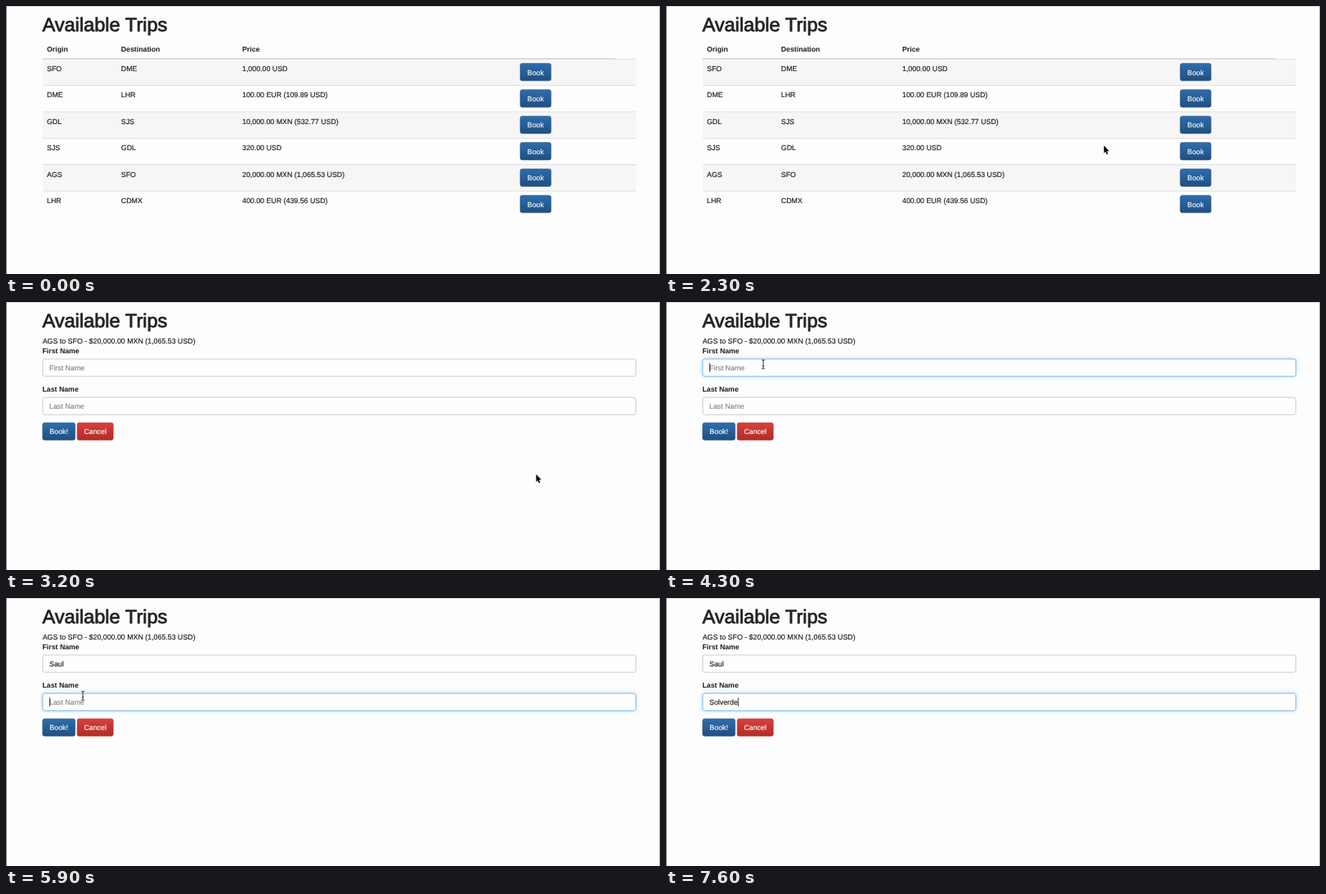
Animation of 800x329 px, one loop 8 s. Source, as an HTML page:

```html
<!DOCTYPE html>
<html lang="en">
<head>
<meta charset="utf-8">
<title>Available Trips</title>
<style>
html, body { margin: 0; width: 100%; height: 100%; overflow: hidden; background: #fdfdfd }
svg { display: block; width: 100%; height: 100% }
text { font: 8.84px "Liberation Sans", Arial, sans-serif; fill: #1c1c1c; stroke: #1c1c1c; stroke-width: .15; white-space: pre; text-rendering: geometricPrecision }
.bold { font-weight: bold; font-size: 8.75px; stroke: none }
.title { font-size: 23.6px; fill: #222; stroke: #222; stroke-width: .75 }
.label { fill: #fff; stroke: #fff; text-anchor: middle }
.hint { fill: #858585; stroke: #858585 }
.field { fill: #fefefe; stroke: #c8c8c8; stroke-width: .9 }
.field.focus { stroke: #78b8ee; filter: drop-shadow(0 0 2px rgba(102, 175, 233, .5)) }
.blue { fill: url(#blue); stroke: #24527f; stroke-width: .6 }
.blue.hover { fill: #204f80 }
.red { fill: url(#red); stroke: #b4302d; stroke-width: .6 }
</style>
</head>
<body>
<svg viewBox="0 0 800 329">
  <defs>
    <linearGradient id="blue" x2="0" y2="1"><stop stop-color="#2e6dae"/><stop offset="1" stop-color="#204f80"/></linearGradient>
    <linearGradient id="red" x2="0" y2="1"><stop stop-color="#d5413d"/><stop offset="1" stop-color="#b32b28"/></linearGradient>
  </defs>
  <path d="M0 .5H800" stroke="#d4d4d4"/>
  <path d="M.5 0V329" stroke="#858585"/>
  <path d="M799.5 0V329" stroke="#bcbcbc"/>
  <text class="title" x="44.4" y="31">Available Trips</text>
  <g id="table"></g>
  <g id="form"></g>
  <g id="cursor">
    <path id="arrow" d="M0 0V9.4L2 7.5 3.5 10.9 5 10.3 3.5 6.9H6.4Z" stroke="#fff" stroke-width="1" paint-order="stroke"/>
    <path id="beam" d="M-2 -5.5Q0 -5.5 0 -4.3Q0 -5.5 2 -5.5M0 -4.3V4.3M-2 5.5Q0 5.5 0 4.3Q0 5.5 2 5.5M-1.2 1.8H1.2" fill="none" stroke="#222" stroke-width=".9"/>
    <path id="hand" d="M-1 .8Q0 -.8 1 .8V4.2L5.5 5.2Q6.5 5.6 6.2 7L5.2 11.5H-.8L-4 7.2Q-4.3 5.6 -2.6 6L-1 7.2Z" fill="#fff" stroke="#111" stroke-width=".9"/>
  </g>
</svg>
<script>
const $ = id => document.getElementById(id);

function add(parent, tag, attrs, content = '') {
  const el = document.createElementNS('http://www.w3.org/2000/svg', tag);
  for (const k in attrs) el.setAttribute(k, attrs[k]);
  el.textContent = content;
  return parent.appendChild(el);
}
const text = (parent, x, y, str, cls = '') => add(parent, 'text', { x, y, class: cls }, str);
const box = (parent, x, y, width, height, cls) => add(parent, 'rect', { x, y, width, height, rx: 2.5, class: cls });
function button(parent, x, y, width, label, cls) {
  const rect = box(parent, x, y, width, 21.4, cls);
  text(parent, x + width / 2, y + 14.1, label, 'label');
  return rect;
}

const table = $('table'), form = $('form');
const columns = [50, 140.8, 289], rowHeight = 32.4;
const rows = [
  ['SFO', 'DME', '1,000.00 USD'],
  ['DME', 'LHR', '100.00 EUR (109.89 USD)'],
  ['GDL', 'SJS', '10,000.00 MXN (532.77 USD)'],
  ['SJS', 'GDL', '320.00 USD'],
  ['AGS', 'SFO', '20,000.00 MXN (1,065.53 USD)'],
  ['LHR', 'CDMX', '400.00 EUR (439.56 USD)']
];
const books = rows.map((cells, i) => {
  const y = 64.8 + i * rowHeight;
  if (i % 2 == 0) add(table, 'rect', { x: 45, y, width: 726, height: rowHeight, fill: '#f6f6f6' });
  add(table, 'rect', { x: 45, y, width: 726, height: .7, fill: '#d6d6d6' });
  cells.forEach((c, j) => text(table, columns[j], y + 15.2, c));
  return button(table, 629, y + 5.6, 37.7, 'Book', 'blue');
});
add(table, 'rect', { x: 45, y: 64, width: 700, height: 1.3, fill: '#d6d6d6' });
['Origin', 'Destination', 'Price'].forEach((h, j) => text(table, columns[j], 55.8, h, 'bold'));

function makeField(name, y) {
  text(form, 44.5, y - 6.7, name, 'bold');
  const rect = box(form, 44.9, y, 725.5, 21.2, 'field');
  const value = text(form, 53, y + 13.9);
  const caret = add(form, 'rect', { y: y + 5.2, width: .8, height: 10.8, fill: '#111' });
  return (str, focused, caretOn) => {
    rect.setAttribute('class', focused ? 'field focus' : 'field');
    value.textContent = str || name;
    value.setAttribute('class', str ? '' : 'hint');
    caret.setAttribute('x', 53 + (str ? value.getComputedTextLength() : 0));
    show(caret, focused && caretOn);
  };
}
text(form, 44.7, 50.9, 'AGS to SFO - $20,000.00 MXN (1,065.53 USD)');
const setFirst = makeField('First Name', 70), setLast = makeField('Last Name', 117.1);
button(form, 44.8, 148.2, 39.7, 'Book!', 'blue');
button(form, 87.1, 148.2, 44.1, 'Cancel', 'red');

// Time, x, y of the pointer
const path = [
  [1300, 520, 332], [2300, 535.7, 171.3], [3000, 648.5, 211.4], [3300, 648.5, 211.4],
  [4200, 119, 76.5], [5200, 119, 76.5], [5400, 101.7, 96.3], [5800, 94, 120]
];
// Moment of each key press
const firstKeys = [4700, 4800, 4900, 5000];
const lastKeys = [6500, 6800, 6900, 7100, 7300, 7300, 7500, 7600];

const show = (el, on) => el.setAttribute('visibility', on ? 'inherit' : 'hidden');
const typed = (str, keys, t) => str.slice(0, keys.filter(k => k <= t).length);
const inside = (x, y, left, top, w) => x >= left && x <= left + w && y >= top && y <= top + 21.4;

function pointer(t) {
  const i = path.findIndex(p => p[0] > t);
  if (i < 0) return path[path.length - 1].slice(1);
  if (i == 0) return path[0].slice(1);
  const [a, b] = [path[i - 1], path[i]];
  const u = (t - a[0]) / (b[0] - a[0]), e = u * u * (3 - 2 * u);
  return [1, 2].map(k => a[k] + (b[k] - a[k]) * e);
}

function draw(now) {
  const t = Math.floor(now % 8000 / 100) * 100;
  const onForm = t >= 3200;
  const [x, y] = pointer(t);
  const visible = t >= 1400 && !(t >= 4700 && t < 5300) && t < 6500;

  show(table, !onForm);
  show(form, onForm);
  setFirst(typed('Saul', firstKeys, t), t >= 4300 && t < 5800, onForm);
  setLast(typed('Solverde', lastKeys, t), t >= 5800, t < 6300 || t >= 6500);

  let overButton = false;
  books.forEach((b, i) => {
    const hit = visible && !onForm && inside(x, y, 629, 70.4 + i * rowHeight, 37.7);
    b.setAttribute('class', hit ? 'blue hover' : 'blue');
    overButton = overButton || hit;
  });
  const overField = onForm && [70, 117.1].some(top => inside(x, y, 45, top, 725.5));
  show($('cursor'), visible);
  $('cursor').setAttribute('transform', `translate(${x} ${y})`);
  show($('hand'), overButton);
  show($('beam'), overField);
  show($('arrow'), !overButton && !overField);
  requestAnimationFrame(draw);
}
requestAnimationFrame(draw);
</script>
</body>
</html>
```
